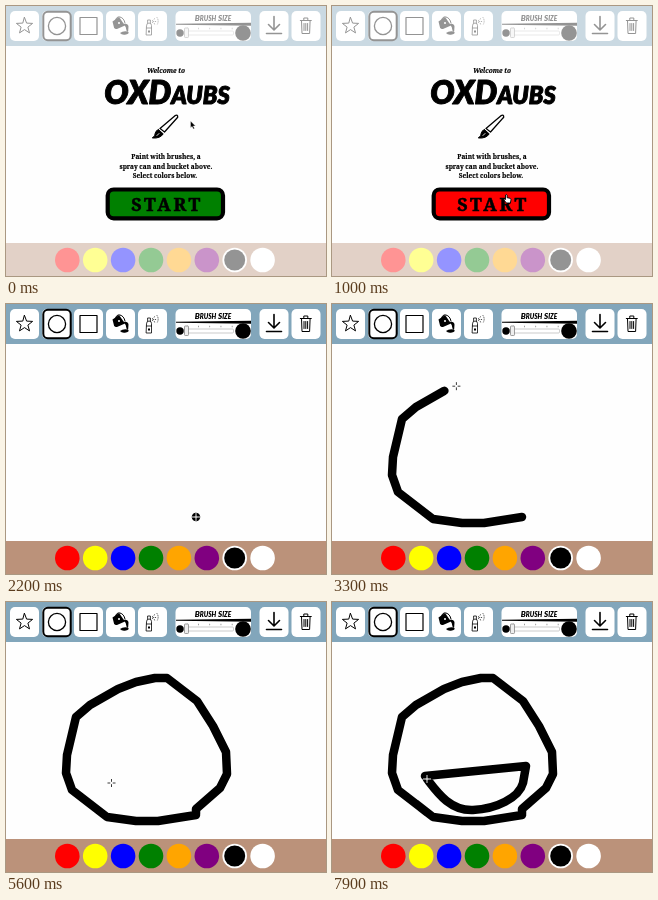
An HTML page that plays this animation: 320x270 px, repeating every 8 s.

```html
<!DOCTYPE html>
<html lang="en">
<head>
<meta charset="utf-8">
<title>Paint app</title>
<style>
html, body { margin: 0; width: 100%; height: 100%; overflow: hidden; background: #fefefe; }
svg { display: block; width: 320px; height: 270px; }
.line { fill: none; stroke: #000; stroke-linecap: round; stroke-linejoin: round; }
.marker { font-family: Lato, sans-serif; font-weight: 900; font-style: italic; }
.slab { font-family: "Noto Serif", serif; font-weight: 700; font-size: 6.5px; stroke: #000; stroke-width: .15; }
.start { font-size: 18px; letter-spacing: 2.6px; stroke-width: .5; }
text { text-anchor: middle; }
</style>
</head>
<body>
<svg viewBox="0 0 320 270" xmlns="http://www.w3.org/2000/svg">
  <rect width="320" height="270" fill="#fefefe"/>
  <rect width="320" height="40" fill="#82a6bb"/>
  <rect y="237" width="320" height="33" fill="#bb927a"/>
  <g id="tools" fill="#fff"></g>
  <g id="colors"></g>

  <!-- tool icons -->
  <path class="line" stroke-width="1" stroke-linejoin="miter" d="M18.5 11.5l2.1 5.6 6 .3-4.7 3.7 1.6 5.8-5-3.3-5 3.3 1.6-5.8-4.7-3.7 6-.3z"/>
  <circle class="line" cx="51" cy="20" r="8.6" stroke-width="1.3"/>
  <rect class="line" x="74" y="11.5" width="17" height="17" stroke-width="1.2" stroke-linejoin="miter"/>
  <g>
    <path d="M106.500 15.500l6.500-4.500 6 8.500-8 3.500q-2 .5-3-1.500z"/>
    <path class="line" stroke-width="1" d="M109 16q1-6 5-5t5 6"/>
    <path d="M117.500 18q4.500-1 5 2.500l-.3 4.500q-1.200 1.500-1.700-.5l-.8-3.500z"/>
    <path d="M114 27q3-2.500 8-1.500 2 2-2 3t-6-1.500z"/>
    <circle cx="113" cy="17" r="1" fill="#fff"/>
  </g>
  <g>
    <path class="line" stroke-width=".8" d="M140.500 19.500q0-2.500 2.500-2.500t2.500 2.500v9.500h-5zM141.600 17v-3h2.800v3M140.500 22h5"/>
    <path d="M142 24.500h2v2h-2z"/>
    <path class="line" stroke-width=".7" stroke-dasharray=".5 1.700" d="M146.500 14.500l3-2.500M147 15.500h4M146.500 16.500l3 2M151 11.500q2 3 .5 6.500"/>
  </g>
  <g>
    <text class="marker" x="207" y="14.500" font-size="8">B<tspan font-size="6.500">RUSH</tspan> S<tspan font-size="6.500">IZE</tspan></text>
    <path d="M170 17.700l75-1v3l-75-1z"/>
    <rect x="177.500" y="25" width="50" height="4" rx="1" fill="#fff" stroke="#aaa" stroke-width=".6"/>
    <path d="M181 22.500h46" stroke="#777" stroke-width="1.500" stroke-dasharray=".7 10.500"/>
    <rect x="178.500" y="22" width="4" height="9.500" rx=".8" fill="#eee" stroke="#777" stroke-width=".7"/>
    <circle cx="174" cy="27" r="3.700"/>
    <circle cx="237" cy="27" r="7.800"/>
  </g>
  <path class="line" stroke-width="1.600" d="M268 10.500v13M262.500 18.500l5.500 5.500 5.500-5.500M260.500 27.500h15"/>
  <path class="line" stroke-width="1" d="M294.300 14.500h11M297.800 14v-2h4v2M295.500 14.500l.5 13h7.600l.5-13M298 17.500v7M299.800 17.500v7M301.600 17.500v7"/>

  <!-- drawing -->
  <path id="face" class="line" stroke-width="8.500" d="M190 213L152 219H130L101 215 66 188 60 171 61 153 70 115 84 103 112 87 130 80 149 76H161L191 99 207 124 220 150 221 172 214 186 190 207V212"/>
  <path id="mouth" class="line" stroke-width="8.500" d="M93 174L194 164 191 181C187 196 164 207 141 208S105 190 95 177"/>

  <!-- welcome screen -->
  <g id="welcome">
    <rect width="320" height="270" fill="#fff" opacity=".58"/>
    <text class="slab" x="160" y="67" font-style="italic">Welcome to</text>
    <text class="marker" x="161" y="97.500" font-size="32" stroke="#000" stroke-width=".9" stroke-linejoin="round">OXD<tspan font-size="23.500">AUBS</tspan></text>
    <g class="line">
      <path fill="#fff" stroke-width="1.300" d="M154 122.500L169 109.700q3-1.500 2.700 1.500L158.500 126z"/>
      <path fill="#000" stroke-width="1" d="M152.500 123.500l4.800 4.200q-3 5-11 4.300 3-2 3-5 .8-3 3.200-3.500z"/>
      <path stroke="#fff" stroke-width=".9" d="M152.700 122.800l5.300 4.600M151 129.500l2-2"/>
    </g>
    <text class="slab" x="160" y="153">Paint with brushes, a</text>
    <text class="slab" x="160" y="162.500">spray can and bucket above.</text>
    <text class="slab" x="159" y="172">Select colors below.</text>
    <rect id="button" x="101.700" y="183.500" width="115.300" height="28.800" rx="6" stroke="#000" stroke-width="4.200"/>
    <text class="slab start" x="161" y="205.200">START</text>
  </g>

  <!-- cursors, each with its hot spot at 0,0 -->
  <path id="arrow" d="M0 0v6.800l1.600-1.400 1.200 2.600 1.200-.6-1.200-2.400h2.200z" stroke="#fff" stroke-width=".4"/>
  <path id="hand" fill="#fff" stroke="#000" stroke-width=".9" stroke-linejoin="round" d="M-1 4.500V0q.8-1.200 1.600 0v2.700l3 .6q1 .3.900 1.500l-.6 3.200h-4l-2.600-3.300q.2-1.100 1.700-.2z"/>
  <g id="cross" fill="none">
    <path d="M-4 0h8M0-4v8" stroke="#fff" stroke-width="1.800" opacity=".75"/>
    <path d="M-4 0h2.800M1.200 0h2.800M0-4v2.800M0 1.200v2.800" stroke="#222" stroke-width=".9"/>
  </g>
</svg>
<script>
const LOOP = 8000, STEP = 100, HOVER = 900, CLICK = 1400, LEAD = 60;
const byId = id => document.getElementById(id);

function add(parent, tag, attrs) {
  const el = document.createElementNS("http://www.w3.org/2000/svg", tag);
  for (const key in attrs) el.setAttribute(key, attrs[key]);
  byId(parent).append(el);
}

const tile = (x, width = 29) => add("tools", "rect", { x, y: 5, width, height: 30, rx: 5 });
for (let i = 0; i < 5; i++) tile(4 + 32 * i);
tile(169.5, 75.5);
tile(253.5);
tile(285.5);
add("tools", "rect", { x: 37.3, y: 5.8, width: 27.4, height: 28.4, rx: 4.5, stroke: "#000", "stroke-width": 2 });

["red", "yellow", "blue", "green", "orange", "purple", "black", "white"].forEach((fill, i) => {
  const cx = 61.3 + i * 27.9, cy = 254;
  const chosen = fill === "black";
  add("colors", "circle", { cx, cy, r: 12.3, fill: chosen ? "white" : fill });
  if (chosen) add("colors", "circle", { cx, cy, r: 10.5, fill });
});

// the pen touches down one step before it moves; power bends its pace
const strokes = [
  { line: byId("face"), start: 2300, end: 4400, power: 0.83 },
  { line: byId("mouth"), start: 6200, end: 7900, power: 1.05 }
];

// pointer moves while the pen is up
const home = [184.5, 115];
const moves = [
  { start: 100, end: 900, to: [174.5, 189] },
  { start: 1500, end: 2100, to: [190, 213] },
  { start: 4500, end: 5200, to: [105.5, 181] },
  { start: 5600, end: 6100, to: [93, 174] }
];

const part = (t, { start, end }) => Math.min(1, Math.max(0, (t - start) / (end - start)));
const smooth = k => k * k * (3 - 2 * k);
const show = (id, on) => byId(id).setAttribute("visibility", on ? "visible" : "hidden");

function glide(t) {
  return moves.reduce((from, move) => {
    const k = smooth(part(t, move));
    return from.map((v, i) => v + (move.to[i] - v) * k);
  }, home);
}

function draw(time) {
  const t = Math.floor(time / STEP) * STEP;
  let cursor = glide(t);

  for (const pen of strokes) {
    const { line, start, end, power } = pen;
    const total = line.getTotalLength();
    const reach = at => total * part(at, pen) ** power;
    const down = t >= start - STEP;
    show(line.id, down);
    line.setAttribute("stroke-dasharray", `${reach(t) + 0.01} ${total + 9}`);
    // the pointer runs a little ahead of the ink
    if (down && t <= end) {
      const p = line.getPointAtLength(reach(t + LEAD));
      cursor = [p.x, p.y];
    }
  }

  const welcome = t < CLICK, hover = t >= HOVER;
  show("welcome", welcome);
  byId("button").setAttribute("fill", hover ? "#f00" : "#008000");
  show("arrow", !hover);
  show("hand", welcome && hover);
  show("cross", !welcome);
  for (const id of ["arrow", "hand", "cross"]) {
    byId(id).setAttribute("transform", `translate(${cursor})`);
  }
}

const begin = performance.now();
function tick() {
  draw((performance.now() - begin) % LOOP);
  requestAnimationFrame(tick);
}
tick();
</script>
</body>
</html>
```
